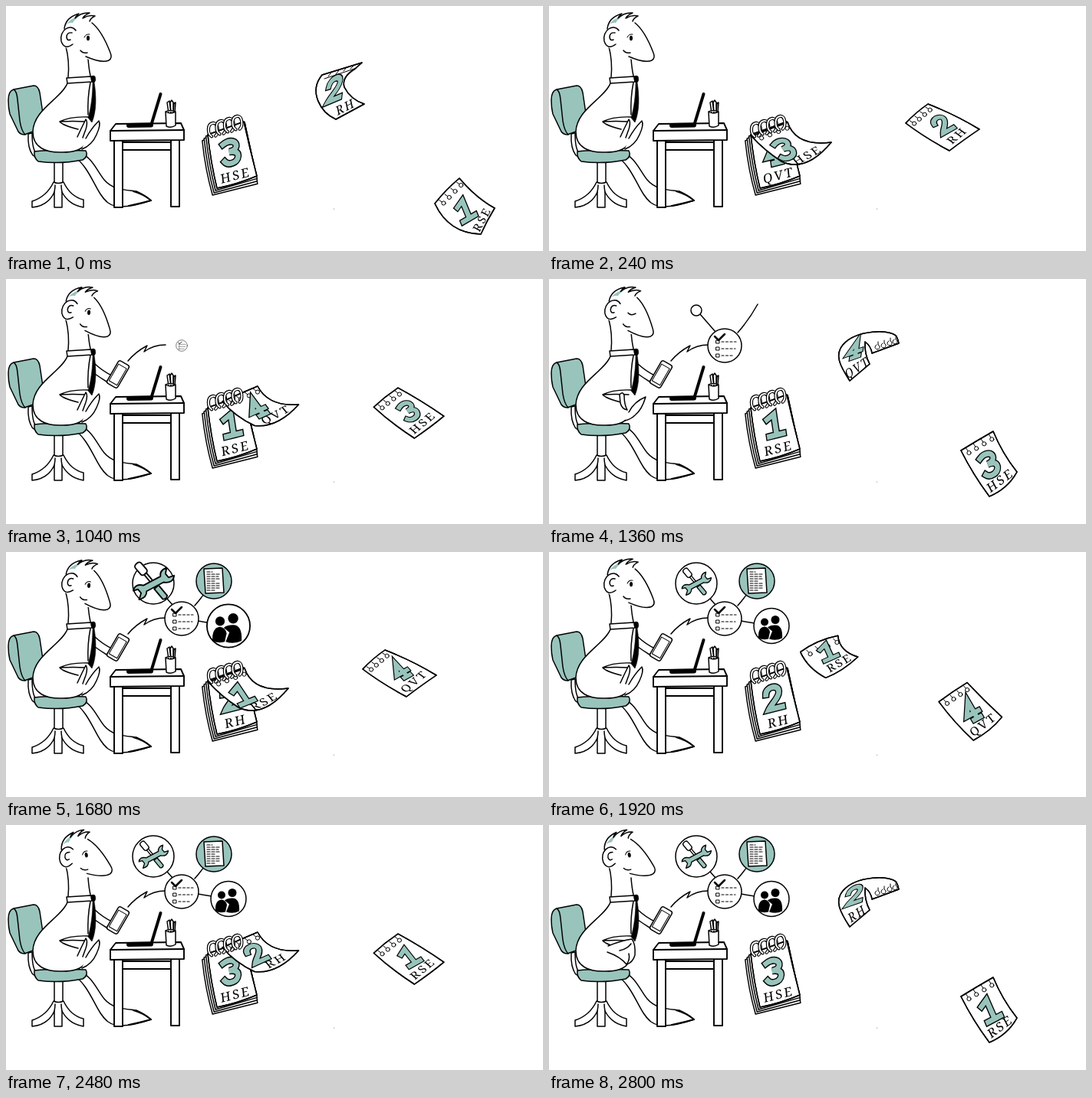
These frames come from a looping animation (700x320 px, 2.88 s). An HTML page:

```html
<!DOCTYPE html>
<html lang="fr">
<head>
<meta charset="utf-8">
<title>Calendar</title>
<style>
html, body { margin: 0; width: 100%; height: 100%; overflow: hidden; background: #fff; }
svg { display: block; width: 700px; height: 320px; }
.ink { fill: none; stroke: #000; stroke-width: 1.5; stroke-linecap: round; stroke-linejoin: round; }
.desk { stroke-width: 1.9; }
.w { fill: #fff; }
.g { fill: #98c4bc; }
.k { fill: #000; }
.bare { stroke: none; }
.fine { stroke-width: 1; }
.label { font: 17px "Noto Serif", "DejaVu Serif", serif; letter-spacing: 2.5px; text-anchor: middle; fill: #000; stroke: none; }
.digit { stroke-linecap: square; stroke-linejoin: miter; stroke-width: 9.6; }
.face { stroke: #98c4bc; stroke-width: 6.8; }
</style>
</head>
<body>
<svg viewBox="0 0 700 320">
  <g class="ink">
    <!-- chair -->
    <path class="g" d="M3 123Q3 111 10 109L36 104Q42 104 44 113L48 140Q42 150 38 163L24 168Q19 168 16 164L5 141Q3 133 3 123Z"/>
    <path d="M10 109Q14 111 15 122L18 150Q20 163 25 168"/>
    <path class="w" d="M29 167Q28 186 35 195L41 199L40 193Q34 188 34 166Z"/>
    <path class="w" d="M63 203V235H74V203Z"/>
    <path class="w" d="M62 230Q53 249 34 255L34 263Q55 261 63 243V263H73V243Q82 260 101 263V253Q84 249 75 230Q68 233 62 230Z"/>
    <path d="M63 243Q64 238 64 234M73 243Q72 238 72 234"/>
    <!-- tail -->
    <path class="w" d="M92 190C112 195 118 215 128 227C139 240 154 240 170 242Q181 247 189 254Q166 262 150 262Q140 262 133 257C116 244 112 212 86 194Z"/>
    <path d="M166 242Q180 246 189 254Q174 258 160 261" stroke-width="2"/>
    <path class="g" d="M37 190Q60 187 104 189Q108 196 100 201Q70 207 42 203Q36 198 37 190Z"/>
  </g>
  <g id="person" class="ink"></g>
  <g class="ink desk">
    <path class="w" d="M141 175V263H152V175ZM215 175V262H226V175Z"/>
    <path d="M152 178H215M152 188H215"/>
    <path class="w" d="M143 154L228 153L232 162V175L136 176V163Z"/>
    <path d="M136 163L232 162"/>
    <path d="M160 156L189 155.500" stroke-width="6"/>
    <path d="M190 153L201.500 115" stroke-width="4"/>
    <g class="ink">
      <path class="w" d="M212 140L210 126L213 124L215 140M215 140L214 126L216 123L218 126V140M218 140L219 127L221 126L220 140"/>
      <path class="w" d="M208 138Q214 135 221 138L221 156Q215 160 209 157ZM208 138Q214 142 221 138"/>
    </g>
  </g>
  <g id="bubbles" class="ink"></g>
  <g id="pages" class="ink"></g>
  <circle cx="427.500" cy="265" r=".6" fill="#777"/>
</svg>
<script>
const STEP = 80, LOOP = 2880;
const el = id => document.getElementById(id);
const clamp = x => Math.max(0, Math.min(1, x));
const mix = (a, b, k) => a + (b - a) * k;
const ramp = (n, from, to) => clamp((n - from) / (to - from));
const path = (d, cls = '', extra = '') => `<path class="${cls}" d="${d}" ${extra}/>`;
const disc = (x, y, r, cls = 'w') => `<circle class="${cls}" cx="${x}" cy="${y}" r="${r}"/>`;
const group = (tf, body) => `<g transform="${tf}">${body}</g>`;

/* ---------- calendar ---------- */
const LABELS = ['RSE', 'RH', 'HSE', 'QVT'];
const DIGITS = [
  'M-8 -9L2 -14V13M-8 13H11',
  'M-10 -7C-9 -17 9 -17 8 -7C7 1 -4 6 -9 13H10',
  'M-9 -12C1 -17 11 -12 8 -5Q6 -1 -2 -1Q10 0 9 7C7 16 -6 16 -10 10',
  'M3 13V-13L-9 5H10M-2 14H8'
];

// at: step in the flight; q: four corners, then four edge controls; n, t: digit and label matrices
const POSES = [
  { at: 0, q: [263,168, 310,151, 327,222, 275,238, 286,160, 318,187, 301,233, 267,205],
    n: [.95,-.24,.15,1,293,191], t: [.97,-.24,.1,.97,300,227] },
  { at: 1, q: [263,168, 310,151, 338,215, 276,236, 286,160, 316,198, 306,237, 267,205],
    n: [.95,-.24,.15,.95,293,190], t: [.98,-.26,.25,.9,303,223] },
  { at: 3, q: [264,170, 311,152, 368,178, 303,203, 286,161, 322,184, 335,218, 280,188],
    n: [.85,-.35,.5,.75,307,187], t: [.87,-.47,.55,.65,340,199] },
  { at: 5, q: [300,150, 345,128, 395,150, 345,180, 322,139, 362,150, 372,172, 318,172],
    n: [.8,-.4,.5,.6,345,150], t: [.85,-.45,.5,.6,370,163] },
  { at: 8, q: [383,92, 440,72, 418,111, 392,133, 405,66, 412,90, 405,123, 376,112],
    n: [.85,-.3,-.1,.75,398,92], t: [.72,-.48,.35,.9,404,121],
    d: 'M392 133C379 113 372 99 383 86C400 66 446 65 453 75Q455 79 456 84L421 97Q420 88 412 82Q411 98 418 111Z',
    ext: 'M427 86a3 3 0 1 0 2 0v-4M435 84a3 3 0 1 0 2 0v-4M443 81a3 3 0 1 0 2 0v-4M450 79a3 3 0 1 0 2 0v-3' },
  { at: 9, q: [412,90, 464,74, 467,128, 430,148, 438,82, 434,101, 449,138, 394,118],
    n: [.82,-.35,-.12,1.03,428,109], t: [.82,-.42,.2,.92,444,137],
    d: 'M412 90L464 74L455 82Q437 93 441 106Q449 122 467 128L430 148C410 139 394 112 412 90Z',
    ext: 'M415 95L457 81M424 87l-4 5M434 84l-4 5M444 80l-4 5M453 78l-4 4' },
  { at: 10, q: [441,103, 486,86, 507,117, 462,157, 463,94, 480,112, 494,146, 434,142],
    n: [.8,-.4,.25,.9,463,132], t: [.8,-.4,.4,.5,480,148], blank: true,
    d: 'M441 103L486 86Q477 102 481 116Q483 126 480 134L507 117Q494 146 462 157C438 157 436 130 441 103Z',
    ext: 'M480 134Q467 139 457 156' },
  { at: 12, q: [465,153, 494,128, 561,161, 522,189, 478,139, 530,142, 543,173, 490,172],
    n: [.7,-.4,.55,.6,513,155], t: [.72,-.6,.68,.48,536,172] },
  { at: 17, q: [537,224, 579,199, 610,252, 574,284, 558,211, 591,228, 598,274, 553,256],
    n: [.85,-.45,.4,.92,574,242], t: [.78,-.58,.45,.85,591,268] },
  { at: 18, q: [559,258, 591,225, 637,264, 619,298, 573,240, 613,251, 627,280, 577,297],
    n: [.8,-.47,.35,.85,598,267], t: [.42,-.78,.75,.4,625,281] },
  { at: 19, q: [587,288, 611,254, 671,276, 648,314, 595,268, 640,270, 655,293, 613,301],
    n: [.58,-.6,.7,.5,627,285], t: [.38,-.74,.78,.3,655,292] }
];

function poseAt(u) {
  const i = POSES.findIndex(p => p.at >= u), b = POSES[i];
  if (b.at === u) return b;
  const a = POSES[i - 1], k = (u - a.at) / (b.at - a.at);
  const blend = key => a[key].map((v, j) => mix(v, b[key][j], k));
  return { at: u, q: blend('q'), n: blend('n'), t: blend('t') };
}

function outline(q) {
  const p = i => q[2 * i] + ' ' + q[2 * i + 1];
  return `M${p(0)}Q${p(4)} ${p(1)}Q${p(5)} ${p(2)}Q${p(6)} ${p(3)}Q${p(7)} ${p(0)}Z`;
}

function holes(q) {
  const dx = q[6] - q[0], dy = q[7] - q[1], len = Math.hypot(dx, dy);
  const ux = dx / len, uy = dy / len;
  return [.15, .38, .62, .86].map(k => {
    const x = mix(q[0], q[2], k) + ux * 8, y = mix(q[1], q[3], k) + uy * 8;
    return `<g class="fine">${disc(x, y, 2.6)}${path(`M${x - ux * 3} ${y - uy * 3}l${-ux * 4} ${-uy * 4}`)}</g>`;
  }).join('');
}

function page(kind, u) {
  const p = poseAt(u), d = p.d || outline(p.q);
  let print = group(`matrix(${p.n})`, path(DIGITS[kind], 'digit') + path(DIGITS[kind], 'digit face'));
  if (!p.blank) print += `<text class="label" transform="matrix(${p.t})">${LABELS[kind]}</text>`;
  if (p.d) print = `<clipPath id="cut${u}"><path d="${d}"/></clipPath><g clip-path="url(#cut${u})">${print}</g>`;
  const marks = p.ext ? path(p.ext, 'fine') : '';
  const punched = u >= 2 && u !== 8 && u !== 9;
  return path(d, 'w') + (punched ? holes(p.q) : '') + print + path(d) + marks;
}

function rings() {
  const d = 'M-3 8C-8 4 -7 -9 1 -9C8 -9 7 5 2 8';
  return [0, 1, 2, 3].map(i => group(`translate(${270 + 10.5 * i} ${162 - 3 * i}) rotate(-8)`,
    path(d, '', 'stroke-width="4.2"') + path(d, '', 'stroke="#fff" stroke-width="1.9"'))).join('');
}

const stack = [3, 2, 1].map(i => {
  const x = -2.4 * i, y = 3 * i;
  return path(`M${263 + x} ${167 + y}L311 152L${327 + i * .3} ${222 + 3.4 * i}L${275 + x * .8} ${238 + y}Q${267 + x} ${205 + y} ${263 + x} ${167 + y}Z`, 'w');
}).join('');

function calendar(n) {
  const turn = Math.floor(n / 9), p = n % 9;
  const kind = back => (turn + 6 - back) % 4;
  let out = stack + page(kind(p ? -1 : 0), 0);
  if (p) out += page(kind(0), p);
  out += rings() + page(kind(1), p + 9);
  if (p < 2) out += page(kind(2), p + 18);
  return out;
}

/* ---------- character ---------- */
const LAPS = [
  'M93 171Q98 160 104 148Q107 152 104 161L100 172M104 173Q111 160 121 150Q124 155 118 168Q112 182 99 187',
  'M92 151Q96 146 98 152Q98 164 102 171Q95 170 93 162ZM104 174Q111 160 126 154Q121 171 112 178Q107 183 99 185',
  'M77 158Q94 151 108 149Q113 155 112 170Q109 180 101 182Q93 172 76 166M92 164Q102 162 107 155M101 182Q106 176 104 168'
];

function head(n) {
  const tilt = n < 24 ? 5 * ramp(n, 10, 13) : mix(5, -9, ramp(n, 23, 26));
  const shut = n >= 16 && n <= 18;
  const eye = shut ? path('M102 43Q106 47 112 43')
    : '<ellipse class="k bare" cx="107" cy="42" rx="2" ry="3.200"/>' + path('M102 41Q104 36 109 37', 'fine');
  return group(`rotate(${tilt} 88 55)`,
    path('M76 29Q72 40 77 54L108 70Q125 75 134 71Q139 68 136 62C131 48 123 32 112 22L90 15Z', 'w bare') +
    path('M78 25Q84 16 96 13Q89 18 87 22Q82 21 78 25Z', 'g bare') +
    path('M76 30C77 20 84 13 95 10Q91 13 90 16Q98 8 109 9Q102 12 100 16Q108 11 116 13Q110 16 109 20') +
    path('M112 22C122 30 131 48 136 61Q139 68 134 71Q125 75 104 66') +
    path('M91 32C84 22 69 32 72 46Q76 58 87 50', 'w') + path('M86 35Q79 34 79 41Q80 46 84 44') +
    path('M97 58Q100 62 106 61') + eye);
}

function phone(n) {
  if (n < 8) return '';
  const k = ramp(n, 9, 12), x = n < 9 ? 126 : mix(134, 146, k), y = n < 9 ? 136 : mix(130, 124.5, k);
  const arm = k > 0 ? path('M116 111Q127 121 138 126L131 134Q123 129 116 124', 'w') : '';
  return arm + group(`translate(${x} ${y}) rotate(${mix(-29, -60, k)})`,
    `<rect class="w" x="-17" y="${mix(-7, -8, k)}" width="34" height="${mix(14, 16, k)}" rx="3"/>` +
    `<rect class="fine" x="-13" y="${mix(-5, -6, k)}" width="25" height="${mix(10, 12, k)}"/>`);
}

function person(n) {
  const lap = n >= 32 ? 2 : n % 6 >= 4 ? 1 : 0;
  return path('M77 50Q83 72 81 94L109 92Q109 80 105 66Z', 'w bare') +
    path('M78 53Q83 72 81 93M107 69Q108 82 110 91') + head(n) +
    path('M80 101C72 121 36 135 35 164C35 185 52 192 74 191Q98 191 106 180L110 150L113 100Z', 'w bare') +
    path('M80 101C72 121 36 135 35 164C35 185 52 192 74 191Q95 191 102 182M110 100Q106 120 107 142') +
    path('M79 94L111 92L112 99L80 101Z', 'w') +
    path('M107 145Q84 144 70 151Q74 156 94 161M70 151Q88 150 104 151') +
    path(LAPS[lap], 'w') + phone(n) +
    path('M111 92Q114 90 116 92Q118 97 115 100C118 118 118 138 112 152L107 146C111 133 113 115 113 100Q110 97 111 92Z', 'k', 'stroke-width=".6"');
}

/* ---------- bubbles ---------- */
const scaled = (x, y, s, body) => group(`translate(${x} ${y}) scale(${s})`, body);

const checklist = disc(0, 0, 22) +
  path('M-13 -12L-8 -7L0 -15', '', 'stroke-width="2.5"') +
  [-5, 4, 13].map((y, i) => path(`M-11 ${y - 2}h4v4h-4z`, 'fine') +
    path(`M-4 ${y}H${[15, 14, 11][i]}`, '', 'stroke-dasharray="3 2.5" stroke-width="1.2"')).join('');

const tools =
  group('rotate(50)', '<rect class="w" x="-27" y="-4" width="14" height="8" rx="3"/>' +
    path('M-13 -1.500H6V1.500H-13Z', 'w') + path('M5 -3H19Q22 0 19 3H5Z', 'g')) +
  group('rotate(-28)', path('M-10 -3H10Q12 -9 20 -8L16 -3L17 2L23 3Q18 10 10 4H-10Q-13 10 -21 8L-16 3L-17 -2L-22 -3Q-17 -9 -10 -3Z', 'g'));

const sheet = disc(0, 0, 23, 'g') + path('M-13 -16L11 -17L13 15L-11 16Z', 'w') +
  [7, 17, 15, 18, 11, 17, 16, 18, 12].map((len, i) =>
    path(`M-9 ${-12 + 3 * i}h${len}`, '', 'stroke-dasharray="4 2" stroke-width="1.2"')).join('');

const people = disc(0, 0, 23) + disc(-9, -5, 5, 'k bare') + disc(5, -8, 5.5, 'k bare') +
  path('M-17 16Q-18 2 -9 1Q-3 2 -2 8L-4 17Q-11 19 -17 16Z', 'k bare') +
  path('M-5 2Q-2 -1 5 -1Q15 -1 14 16Q6 20 -3 17L1 7Z', 'k bare');

function link(x1, y1, x2, y2, k) {
  return k > 0 ? path(`M${x1} ${y1}L${mix(x1, x2, k)} ${mix(y1, y2, k)}`) : '';
}

function bubbles(n) {
  if (n < 12) return '';
  let out = path('M159 107Q169 95 184 87L180 95Q192 86 208 86', '',
    `pathLength="100" stroke-dasharray="${100 * ramp(n, 11, 13)} 200"`);
  const lines = ramp(n, 15, 17), pop = ramp(n, 17, 20);
  out += link(217, 69, 197, 46, lines);
  if (lines > 0) out += path(`M246 70Q${mix(246, 261, lines)} ${mix(70, 53, lines)} ${mix(246, 272, lines)} ${mix(70, 33, lines)}`);
  out += link(250, 90, 268, 93, ramp(n, 17, 19));
  if (n > 12) out += scaled(229, 87, ramp(n, 12, 15), checklist);
  if (n > 16) out += disc(192, 41, mix(7, 27, pop));
  if (n > 18) out += scaled(192, 41, n < 22 ? mix(.5, 1.25, ramp(n, 18, 21)) : n < 23 ? 1.1 : .9, tools);
  if (n > 17) out += scaled(271, 38, pop, sheet);
  if (n > 18) out += scaled(290, 96.5, n < 22 ? mix(.2, 1.22, ramp(n, 18, 21)) : n < 23 ? 1.1 : 1, people);
  return out;
}

/* ---------- clock ---------- */
const start = performance.now();
let shown = -1;
function draw() {
  const n = Math.floor(((performance.now() - start) % LOOP) / STEP);
  if (n !== shown) {
    shown = n;
    el('person').innerHTML = person(n);
    el('bubbles').innerHTML = bubbles(n);
    el('pages').innerHTML = calendar(n);
  }
  requestAnimationFrame(draw);
}
draw();
</script>
</body>
</html>
```
